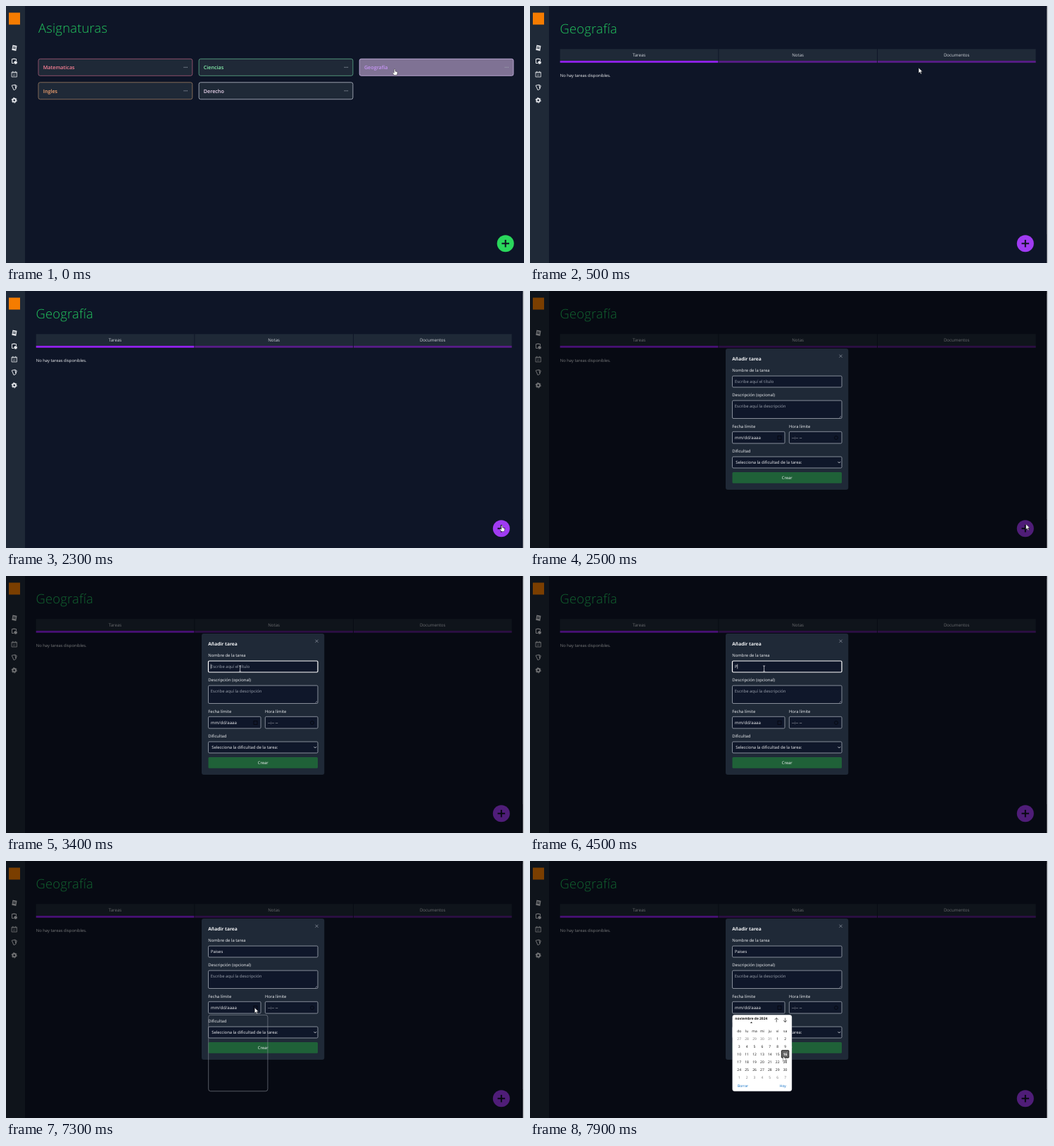
An HTML page that plays this animation: 736 by 366 pixels, repeating every 8 s.

```html
<!DOCTYPE html>
<html lang="es">
<head>
<meta charset="utf-8">
<title>Asignaturas</title>
<style>
  html, body { margin: 0; width: 100%; height: 100%; overflow: hidden; background: #0e1527; }
  svg { display: block; width: 736px; height: 366px; }
  text { font: 5.9px "Open Sans", "Noto Sans", sans-serif; fill: #f3f4f6; text-rendering: geometricPrecision; white-space: pre; }
  .title { font-size: 18.4px; font-weight: 300; letter-spacing: .2px; fill: #22c55e; }
  .card { font-size: 7.2px; font-weight: 600; }
  .tab { font-size: 6.15px; fill: #d1d5db; }
  .label { font-weight: 500; }
  .hint { fill: #9ca3af; }
  .field { fill: #0f172a; stroke: #b6bcc6; stroke-width: .7; }
  .line { fill: none; stroke: #e5e7eb; stroke-width: 1; }
  .day { font-size: 5px; font-weight: 500; fill: #111; }
  .bold { font-weight: 700; }
  .mid { text-anchor: middle; }
</style>
</head>
<body>
<svg viewBox="0 0 736 366">
  <rect width="736" height="366" fill="#0e1527"/>
  <rect width="27" height="366" fill="#1f2937"/>
  <rect x="4" y="9.5" width="16" height="17" fill="#f57c00"/>
  <g id="icons">
    <path d="M9.5 55.5l6 1.2-1.2 7.3-6-1.2z" fill="#e5e7eb"/>
    <path d="M10 58.2l4 .8M9.7 60l4 .8" class="line" stroke-width=".5" style="stroke:#1f2937"/>
    <path d="M11 81.5H8.500v-6h6v2.500M10 75.200h3" class="line"/>
    <circle cx="13.600" cy="80.500" r="2.300" fill="#e5e7eb"/>
    <path d="M8 94.200h7.400v6.800H8zM8 95h7.400M9.800 92.800v1.500M13.600 92.800v1.500" class="line" style="stroke-width:.8"/>
    <text x="11.700" y="100.200" class="mid" style="font-size:4px">31</text>
    <path d="M8.200 113.200l4.600-1 2.500 1.500-1.600 4.800-2.600 1.200zM12.800 112.200l1 5" class="line"/>
    <circle cx="11.700" cy="134.300" r="2.300" class="line" style="stroke-width:1.800"/>
    <circle cx="11.700" cy="134.300" r="3.600" class="line" stroke-dasharray="1.900 1.870"/>
  </g>

  <g id="subjects">
    <text x="46" y="37.800" class="title">Asignaturas</text>
  </g>

  <g id="subject">
    <text x="42.500" y="38.900" class="title">Geografía</text>
    <g id="tabs"></g>
    <text x="42.800" y="100.600" style="font-size:5.850px">No hay tareas disponibles.</text>
  </g>

  <g id="fab">
    <circle r="12"/>
    <path d="M-5.300 0H5.300M0-5.300V5.300" stroke="#0e1322" stroke-width="2"/>
  </g>

  <g id="modal">
    <rect width="736" height="366" opacity=".5"/>
    <rect x="278" y="82" width="174.300" height="201" rx="3" fill="#1f2937"/>
    <text x="287.300" y="99.300" class="bold" style="font-size:6.600px">Añadir tarea</text>
    <path d="M439.500 90.700l4 4m0-4l-4 4" class="line" style="stroke:#9ca3af;stroke-width:.7"/>
    <text x="287.300" y="115.400" class="label">Nombre de la tarea</text>
    <rect id="name" x="287.500" y="121" width="155.500" height="16" rx="1.500" class="field"/>
    <text id="typed" x="291" y="131.200"></text>
    <path id="caret" d="M0 125.500v6.700" stroke="#fff" stroke-width=".6"/>
    <text x="287.300" y="150.200" class="label">Descripción (opcional)</text>
    <rect x="287.500" y="156" width="155.500" height="25.500" rx="1.500" class="field"/>
    <path d="M439.500 180.500l2.500-2.500M441 180.500l1-1" class="line" style="stroke-width:.4"/>
    <text x="290.800" y="166.200" class="hint">Escribe aquí la descripción</text>
    <text x="287.300" y="194.700" class="label">Fecha límite</text>
    <text x="368" y="194.700" class="label">Hora límite</text>
    <rect x="287.500" y="200.300" width="74.500" height="16.700" rx="1.500" class="field"/>
    <rect x="368.300" y="200.300" width="74.700" height="16.700" rx="1.500" class="field"/>
    <rect x="352" y="206.500" width="5" height="5" fill="none" stroke="#05070d" stroke-width=".8"/>
    <circle cx="435" cy="209" r="2.500" fill="none" stroke="#05070d" stroke-width=".8"/>
    <text x="291" y="211.200" style="font-size:6.100px">mm/dd/aaaa</text>
    <text x="372" y="211.200">--:-- --</text>
    <text x="287.300" y="230.400" class="label">Dificultad</text>
    <rect x="287.500" y="236" width="155.500" height="16" rx="1.500" class="field"/>
    <text x="292.200" y="246.300">Selecciona la dificultad de la tarea:</text>
    <path d="M437.600 243.200l1.700 1.700 1.700-1.700" class="line" style="stroke-width:.9"/>
    <rect x="287.500" y="258" width="155.500" height="15.700" rx="1.500" fill="#1f6138"/>
    <text x="365.200" y="268.100" class="mid label">Crear</text>
  </g>

  <g id="scrollbar">
    <rect x="734.600" width="1.400" height="366" fill="#dfe2e6"/>
    <rect x="734.300" y="4" width=".8" height="321" fill="#7b8089"/>
  </g>

  <rect id="popupEdge" x="287.700" y="219.300" width="84.200" height="108.500" rx="3" fill="none" stroke="#8b909a" stroke-width=".6"/>
  <g id="popup">
    <rect x="287.700" y="219.300" width="84.200" height="108.500" rx="3" fill="#fff"/>
    <text x="314.300" y="226" class="day mid bold" style="font-size:4.900px">noviembre de 2024</text>
    <path d="M313 230.700h3l-1.500-1.700z"/>
    <path d="M350.200 229.500v-6m-2.500 2.500l2.500-2.500 2.500 2.500M362.500 223.500v6m-2.500-2.500l2.500 2.500 2.500-2.500" fill="none" stroke="#222" stroke-width=".7"/>
    <g id="days"></g>
    <text x="302.500" y="321.700" class="day mid" style="fill:#0067c0">Borrar</text>
    <text x="359.300" y="321.700" class="day mid" style="fill:#0067c0">Hoy</text>
  </g>

  <g id="cursor" fill="#fff" stroke="#111" stroke-width=".4">
    <path id="arrow" d="M0 0V7.600L1.800 6 3 8.700 4.200 8.200 3 5.600H5.400Z"/>
    <path id="hand" d="M-.8 2.200Q0 1.200.8 2.200V5L3.600 5.700Q4.200 6 4 7.200L3.200 10.500H-.8L-3 7.300Q-2.800 6.200-1.700 6.800L-.8 7.400Z"/>
    <path id="beam" d="M-1.500-4H1.500M0-4V4M-1.500 4H1.500" fill="none" stroke="#e5e7eb" stroke-width=".7"/>
  </g>
</svg>
<script>
  const el = id => document.getElementById(id);
  const show = (id, on) => { el(id).style.display = on ? '' : 'none'; };

  // Subject cards: name, text colour, border, fill
  const cards = [
    ['Matematicas', '#f98095', '#a85c76', '#1f2937'],
    ['Ciencias', '#86efac', '#5fae8c', '#1f2937'],
    ['Geografía', '#c795f5', '#cdb6e6', '#7f7294'],
    ['Ingles', '#f5a470', '#9c7d62', '#1f2937'],
    ['Derecho', '#f1d9f3', '#b9bfcb', '#1f2937'],
  ];
  el('subjects').innerHTML += cards.map(([name, ink, edge, fill], i) => {
    const x = 46 + i % 3 * 228.1, y = 75.3 + (i > 2) * 33.5;
    return `<rect x="${x}" y="${y}" width="218.800" height="24" rx="2.500" fill="${fill}" stroke="${edge}" stroke-width=".8"/>
      <text x="${x + 6.700}" y="${y + 14.700}" class="card" style="fill:${ink}">${name}</text>
      <path d="M${x + 206.500} ${y + 12}h5.500" stroke="#9ca3af" stroke-dasharray="1.200 .9"/>`;
  }).join('');

  el('tabs').innerHTML = ['Tareas', 'Notas', 'Documentos'].map((name, i) => {
    const x = 42.700 + i * 225.600;
    return `<rect x="${x}" y="61.300" width="224.700" height="19.500" fill="#1f2937"/>
      <rect x="${x}" y="78" width="224.700" height="2.800" fill="${i ? '#581c87' : '#9020ea'}"/>
      <text x="${x + 112.300}" y="72.400" class="tab mid">${name}</text>`;
  }).join('');

  const cell = (i, row, text, style = '') =>
    `<text x="${297.200 + i * 10.900}" y="${row * 10.900 + 244.100}" class="day mid" style="${style}">${text}</text>`;
  let days = ['do', 'lu', 'ma', 'mi', 'ju', 'vi', 'sa'].map((d, i) => cell(i, 0, d)).join('');
  days += '<rect x="357.300" y="269.700" width="10.500" height="10.500" rx=".8" fill="#666" stroke="#111" stroke-width=".9"/>';
  for (let i = 0; i < 42; i++) {
    const n = i - 4, inside = n > 0 && n < 31;
    const style = n == 16 ? 'fill:#fff;font-weight:700' : inside ? '' : 'fill:#777;font-weight:400';
    days += cell(i % 7, 1 + (i / 7 | 0), n < 1 ? n + 31 : n > 30 ? n - 30 : n, style);
  }
  el('days').innerHTML = days;

  // Pointer stops: time, x, y
  const path = [
    [0, 552.200, 88], [900, 552.200, 88], [1200, 463, 140], [1700, 659, 291], [1800, 661, 293],
    [2300, 704.600, 332], [2500, 704.600, 332], [3300, 332.600, 132], [6300, 332.600, 132],
    [6900, 353.300, 209], [7300, 353.300, 209], [7900, 359.500, 278], [8000, 359.500, 278],
  ];
  function pointer(t) {
    const i = path.findIndex(p => p[0] > t), [t0, x0, y0] = path[i - 1], [t1, x1, y1] = path[i];
    const u = (t - t0) / (t1 - t0), k = u * u * (3 - 2 * u);
    return [x0 + (x1 - x0) * k, y0 + (y1 - y0) * k];
  }

  const keyTimes = [4500, 4900, 5000, 5200, 5500, 5700];
  const between = (t, a, b) => t >= a && t < b;

  function draw(now) {
    const t = Math.floor(now % 8000 / 100) * 100;
    const inSubject = t >= 400, open = t >= 2500;
    show('subjects', !inSubject);
    show('subject', inSubject);
    show('scrollbar', inSubject);
    show('modal', open);
    el('fab').setAttribute('transform', `translate(${inSubject ? 703.800 : 709.700} 338.200)`);
    el('fab').setAttribute('fill', inSubject ? '#a03bf2' : '#2ad75c');

    const focused = between(t, 3400, 7100);
    el('name').style.stroke = focused ? '#fff' : '';
    el('name').style.strokeWidth = focused ? 1.200 : '';
    const typed = 'Paises'.slice(0, keyTimes.filter(k => t >= k).length);
    const field = el('typed');
    field.textContent = typed || 'Escribe aquí el título';
    field.setAttribute('class', typed ? '' : 'hint');
    const lastKey = Math.max(3400, ...keyTimes.filter(k => t >= k));
    show('caret', focused && (t - lastKey) % 1000 < 500);
    const caretX = 291.200 + (typed ? field.getComputedTextLength() : 0);
    el('caret').setAttribute('transform', `translate(${caretX} 0)`);

    show('popupEdge', t >= 7300);
    el('popup').setAttribute('opacity', Math.min(1, Math.max(0, (t - 7300) / 200)));

    const [x, y] = pointer(t);
    const hand = t < 100 || !open && inSubject && Math.hypot(x - 703.800, y - 338.200) < 12;
    const beam = open && between(x, 287, 443) && (between(y, 121, 137) || between(y, 156, 181));
    el('cursor').setAttribute('transform', `translate(${x} ${y})`);
    show('hand', hand);
    show('beam', beam);
    show('arrow', !hand && !beam);
  }

  const start = performance.now();
  function loop() {
    draw(performance.now() - start);
    requestAnimationFrame(loop);
  }
  loop();
</script>
</body>
</html>
```
